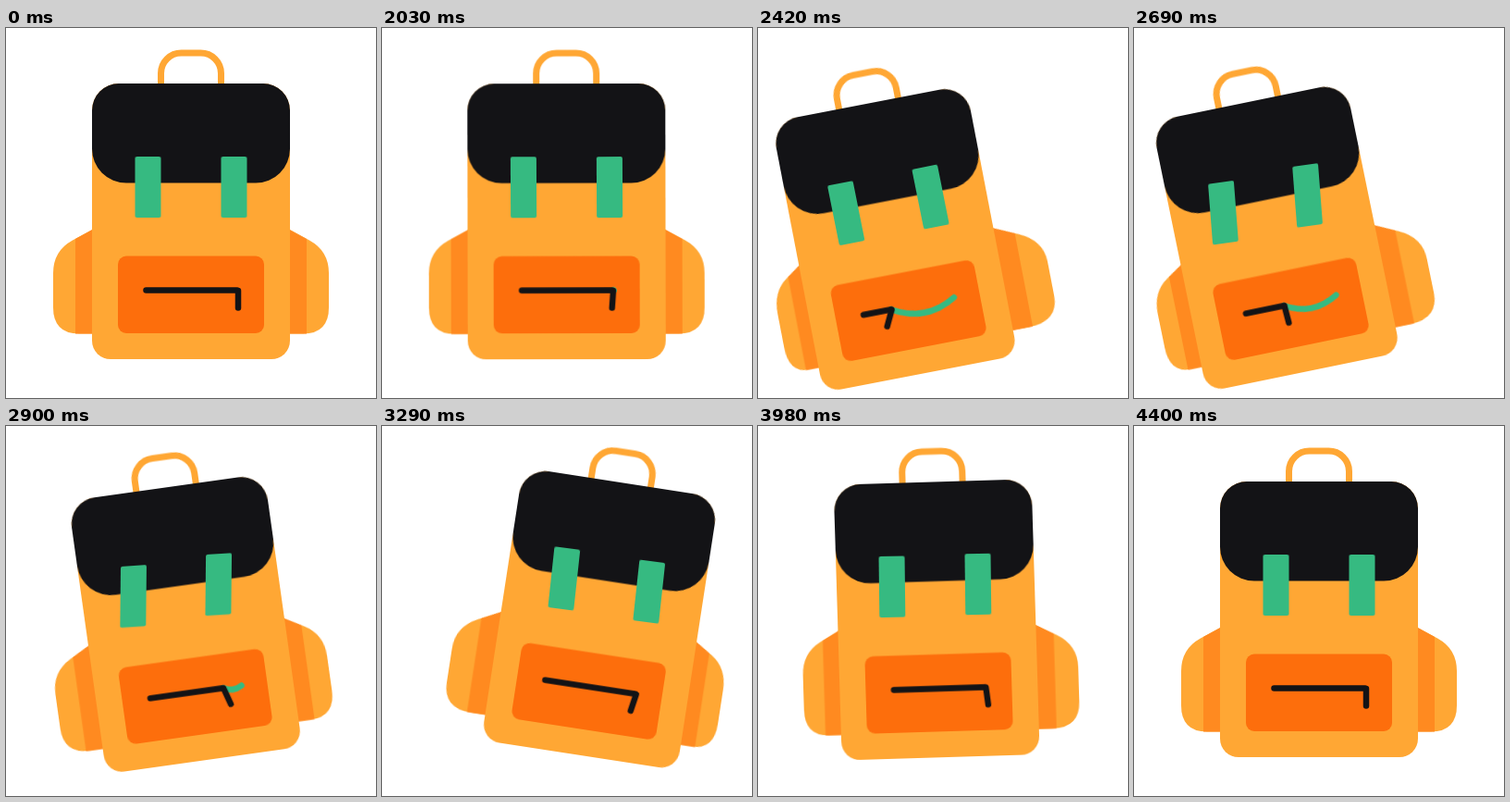
Animation of 400x400 px, one loop 4430 ms. Source, as an HTML page:

```html
<!DOCTYPE html>
<html lang="en">
<head>
<meta charset="utf-8">
<title>Backpack</title>
<style>
  html, body { margin: 0; width: 100%; height: 100%; overflow: hidden; background: #fff; }
  svg { display: block; width: 100vw; height: 100vh; }

  .sway, .lift, .tilt, .side, .strap, .teeth, .gap, .slider, .pull {
    animation: 4430ms cubic-bezier(.37, 0, .63, 1) infinite;
  }
  .sway { animation-name: sway; }
  .lift { animation-name: lift; }
  .tilt { animation-name: tilt; transform-origin: 200px 200px; }
  .side { transform-origin: 93px 275px; }
  .left { animation-name: squash; }
  .right { animation-name: stretch; }
  .strap { animation-name: strap; }
  .teeth { animation-name: teeth; stroke-dasharray: 98 300; }
  .gap { animation-name: gap; transform-origin: 251px 283.5px; }
  .slider { animation-name: slider; }
  .pull { animation-name: pull; transform-origin: 251px 284px; }

  .body { fill: #ffa734; }
  .shade { fill: #ff8a20; }
  .pocket { fill: #fd6e0c; }
  .dark { fill: #131316; }
  .green { fill: #36ba81; }
  .line { fill: none; stroke: #131316; stroke-width: 6.5; stroke-linecap: round; }

  /* Whole bag */
  @keyframes sway {
    0%, 45.15% { transform: translateX(0); }
    57.11% { transform: translateX(-60px); }
    73.14% { transform: translateX(38px); }
    85.78% { transform: translateX(-9px); }
    99.32%, 100% { transform: translateX(0); }
  }
  @keyframes lift {
    0%, 45.15% { transform: translateY(0); }
    57.11% { transform: translateY(21px); }
    70.88% { transform: translateY(-3px); }
    76.75% { transform: translateY(1px); }
    99.32%, 100% { transform: translateY(0); }
  }
  @keyframes tilt {
    0%, 45.15% { transform: rotate(0deg); }
    56.43%, 61.92% { transform: rotate(-11.6deg); }
    74.72% { transform: rotate(8.8deg); }
    85.78% { transform: rotate(-2.2deg); }
    99.32%, 100% { transform: rotate(0deg); }
  }

  /* Side pockets */
  @keyframes squash {
    0%, 45.15% { transform: scaleX(1); }
    56.43% { transform: scaleX(.76); }
    71.11% { transform: scaleX(1.13); }
    84.65% { transform: scaleX(.91); }
    99.32%, 100% { transform: scaleX(1); }
  }
  @keyframes stretch {
    0%, 45.15% { transform: scaleX(1); }
    56.43% { transform: scaleX(1.22); }
    71.11% { transform: scaleX(.83); }
    84.65% { transform: scaleX(1.08); }
    99.32%, 100% { transform: scaleX(1); }
  }

  @keyframes strap {
    0%, 45.15% { transform: rotate(0deg) skewX(0deg); }
    50.34% { transform: rotate(-1.5deg) skewX(1.5deg); }
    64.33% { transform: rotate(4.6deg) skewX(-4.4deg); }
    73.36% { transform: rotate(-1.3deg) skewX(1.3deg); }
    86.91% { transform: rotate(.6deg) skewX(-.6deg); }
    99.32%, 100% { transform: rotate(0deg) skewX(0deg); }
  }

  /* Zip */
  @keyframes teeth {
    0%, 45.15% { stroke-dashoffset: 0; }
    56.43% { stroke-dashoffset: 72; }
    70.32%, 100% { stroke-dashoffset: 0; }
  }
  @keyframes slider {
    0%, 45.15% { transform: translateX(0); }
    56.43% { transform: translateX(-73px); }
    70.32%, 100% { transform: translateX(0); }
  }
  @keyframes gap {
    0%, 45.15% { transform: scale(0); }
    56.43% { transform: scale(.735); }
    70.32%, 100% { transform: scale(0); }
  }
  @keyframes pull {
    0% { transform: rotate(0deg); }
    45.15% { transform: rotate(0deg); animation-timing-function: cubic-bezier(.39, .58, .57, 1); }
    51.92%, 55.3% { transform: rotate(26deg); }
    64.33% { transform: rotate(-18deg); }
    73.36% { transform: rotate(10deg); }
    86.91% { transform: rotate(-7deg); }
    99.32%, 100% { transform: rotate(0deg); }
  }
</style>
</head>
<body>
<svg viewBox="0 0 400 400">
  <defs>
    <g id="side">
      <path class="body" d="M96 216.5L72 229.5Q51 241 51 265V302Q51 330.5 79 330.5H96Z"/>
      <path class="shade" d="M96 216.5L75 228V330.5H96Z"/>
    </g>
    <rect id="strap" class="green" x="-14" width="28" height="66" rx="2"/>
  </defs>
  <g class="sway"><g class="lift"><g class="tilt">
    <path d="M167.5 64V49a22 22 0 0 1 22-22h21a22 22 0 0 1 22 22V64" fill="none" stroke="#ffa734" stroke-width="7"/>
    <g class="side left"><use href="#side"/></g>
    <g transform="matrix(-1 0 0 1 400 0)"><g class="side right"><use href="#side"/></g></g>
    <path class="body" d="M93 89a29 29 0 0 1 29-29H278a29 29 0 0 1 29 29V338a20 20 0 0 1-20 20H113a20 20 0 0 1-20-20Z"/>
    <path class="dark" d="M93 89a29 29 0 0 1 29-29H278a29 29 0 0 1 29 29V130.5a37 37 0 0 1-37 37H130a37 37 0 0 1-37-37Z"/>
    <g transform="translate(153.5 139)"><g class="strap"><use href="#strap"/></g></g>
    <g transform="translate(246.5 139)"><g class="strap"><use href="#strap"/></g></g>
    <rect class="pocket" x="121" y="246.5" width="158" height="83.5" rx="9"/>
    <path class="line gap" d="M251 283.5Q201 313 151 283.5" style="stroke:#36ba81" vector-effect="non-scaling-stroke"/>
    <path class="line teeth" d="M151.5 283.5H249.5"/>
    <g class="slider"><path class="line pull" d="M251 284V302.5"/></g>
  </g></g></g>
</svg>
</body>
</html>
```
